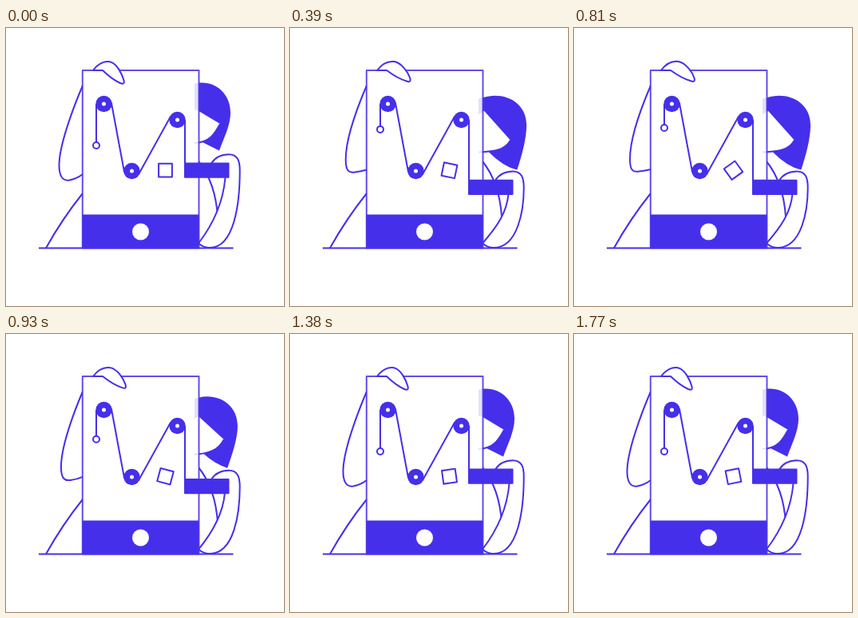
Recreate the animation shown at these times as an HTML page with a canvas. Size 348 by 348 pixels, loop 1.8 s.

```html
<!DOCTYPE html>
<html lang="en">
<head>
<meta charset="utf-8">
<title>Pulleys</title>
<style>
html, body { margin: 0; width: 100%; height: 100%; overflow: hidden; background: #fff; }
canvas { display: block; width: 348px; height: 348px; }
</style>
</head>
<body>
<canvas id="stage"></canvas>
<script>
const LOOP = 1800, STEP = 30, BLUE = '#462fea', WHITE = '#fff';
const WHEELS = [[122.5, 95], [157.5, 179], [214.5, 115]];
const ROPE_R = 9.5;

const canvas = document.getElementById('stage');
const dpr = window.devicePixelRatio || 1;
canvas.width = canvas.height = 348 * dpr;
const c = canvas.getContext('2d');
c.scale(dpr, dpr);

// Timing

const smooth = x => { x = Math.min(1, Math.max(0, x)); return x * x * (3 - 2 * x); };

// Down until 600 ms, back up until `end`.
const pull = (t, end) => smooth(t < 600 ? t / 600 : (end - t) / (end - 600));

// Distance covered at unit speed after speeding up evenly from rest.
const ramp = (t, rise) => t < rise ? t * t / (2 * rise) : t - rise / 2;

// The square spins up, slows to a halt at `stop`, then spins up again.
function turn(t) {
  const speed = 0.327, rise = 300, stop = 1380, brake = 210;
  const total = stop - rise / 2 - brake / 2;
  const run = t < stop / 2 ? ramp(t, rise)
    : total + Math.sign(t - stop) * ramp(Math.abs(t - stop), brake);
  return -speed * run * Math.PI / 180;
}

// Drawing helpers

// Makes points that travel by (dx, dy) as p goes from 0 to 1.
const mover = p => (x, y, dx = 0, dy = 0) => [x + dx * p, y + dy * p];
const off = ([x, y], dx, dy) => [x + dx, y + dy];

function ink(fill, stroke) {
  if (fill) { c.fillStyle = fill; c.fill(); }
  if (stroke) { c.strokeStyle = BLUE; c.lineWidth = 2; c.stroke(); }
}

// Each part holds one point (line), two (quadratic) or three (cubic).
function path(start, ...parts) {
  c.beginPath();
  c.moveTo(...start);
  for (const part of parts) {
    const draw = [c.lineTo, c.quadraticCurveTo, c.bezierCurveTo][part.length - 1];
    draw.apply(c, part.flat());
  }
}

function line(a, b) {
  path(a, [b]);
  ink(null, true);
}

function disc(x, y, r, fill, stroke) {
  c.beginPath();
  c.arc(x, y, r, 0, 7);
  ink(fill, stroke);
}

function box(x, y, w, h, fill, stroke) {
  c.beginPath();
  c.rect(x, y, w, h);
  ink(fill, stroke);
}

// Parts

function sleeve(at) {
  const side = at(66.5, 172, 4.5, -10), bottom = at(79, 190.5, 3, -14);
  path(at(96, 72), [at(84, 100), off(side, 0, -25), side],
    [off(side, 0, 15), off(bottom, -7, 1), bottom],
    [at(88, 189, 1, -13), at(96, 183, 0, -7.7)]);
  ink(null, true);
}

function hand(at) {
  const top = at(130, 42.3, 1, -0.3), tip = at(147.5, 65.5, 4, -3.5);
  path([109, 53], [[115, 45], [123, 41], top],
    [off(top, 9, 2), off(tip, -2.5, -8), tip],
    [off(tip, 1, 4.5), off(tip, -1, 5), off(tip, -4.5, 3.5)],
    [at(133, 64.5, 3, -1.5), [121, 53]]);
  c.closePath();
  ink(WHITE, true);
}

function head(at) {
  const crown = at(241, 68.7, 0, 26), back = at(281, 106, 21, 22);
  const tip = at(267, 153.5, 24, 33.5), nape = at(246, 143, 4, 17);
  const nose = at(268, 120, 11, 28.5), jaw = at(236, 144, 0, 16);
  const chin = [off(nose, -7, 13), off(jaw, 19, -1), jaw];

  path(crown, [at(262, 66, 6, 18), at(281, 82, 21, 13), back],
    [off(back, 0, 16), off(tip, 6, -17), tip],
    [at(256, 148, 14, 35), nape], [[236, 125]], [off(crown, -5, 1)]);
  ink(BLUE);

  path(nose, chin, [at(229, 107, 7, 4)], [at(238, 102, 7, 2.5)]);
  ink(WHITE);
  path(nose, chin);
  ink(null, true);
}

function rightArm(at, y) {
  path([257, y + 1], [[262, y - 7], [270, y - 10.3], [279, y - 10.3]],
    [[290, y - 10.3], [292.7, y - 2], [292.7, y + 10]],
    [at(292.7, 219, 0, 10), [286, 275], [255, 275]],
    [[247, 275], [241, 269.5]],
    [at(259, 246, 0, 4), at(272, 217, -1, 20), at(274.5, 187, -1.5, 29)]);
  ink(WHITE, true);
}

function phone() {
  c.globalAlpha = 0.85;
  box(95.8, 53, 145.7, 222.5, WHITE, true);
  c.globalAlpha = 1;
  box(95.5, 233.5, 146, 42, BLUE);
  disc(168.5, 255, 10.5, WHITE);
}

// Rope crossing between two wheels, touching opposite sides.
function rope([ax, ay], [bx, by], side) {
  const dx = bx - ax, dy = by - ay;
  const a = Math.atan2(dy, dx) + side * Math.acos(2 * ROPE_R / Math.hypot(dx, dy));
  const x = ROPE_R * Math.cos(a), y = ROPE_R * Math.sin(a);
  line([ax + x, ay + y], [bx - x, by - y]);
}

function pulleys(ringY, boxY) {
  const [first, mid, last] = WHEELS;
  line([113, ringY], [113, first[1]]);
  rope(first, mid, -1);
  rope(mid, last, 1);
  line([224, last[1]], [224, boxY + 4]);
  for (const [x, y] of WHEELS) {
    disc(x, y, 10.2, BLUE);
    disc(x, y, 2.5, WHITE);
  }
  disc(113, ringY, 4, WHITE, true);
}

function square(angle) {
  c.save();
  c.translate(199.5, 178.2);
  c.rotate(angle);
  box(-8.4, -8.4, 16.8, 16.8, WHITE, true);
  c.restore();
}

function draw(t) {
  const left = pull(t, 1300), right = pull(t, 1200);
  const atLeft = mover(left), atRight = mover(right);
  const y = 168.5 + 29.5 * right;

  c.fillStyle = WHITE;
  c.fillRect(0, 0, 348, 348);
  c.lineJoin = 'round';

  line([41, 275.5], [284.5, 275.5]);
  path([96, 207], [[71, 238], [50, 275.5]]);
  ink(null, true);
  sleeve(atLeft);
  head(atRight);
  path([241, 167], [[262, 193], [265, 236]]);
  ink(null, true);
  rightArm(atRight, y);
  phone();
  hand(atLeft);
  pulleys(147 - 28 * left, y);
  square(turn(t));

  c.beginPath();
  c.roundRect(223, y, 56.5, 19.3, 1);
  ink(BLUE);
}

function frame(now) {
  draw(Math.floor(now % LOOP / STEP) * STEP);
  requestAnimationFrame(frame);
}
draw(0);
requestAnimationFrame(frame);
</script>
</body>
</html>
```
